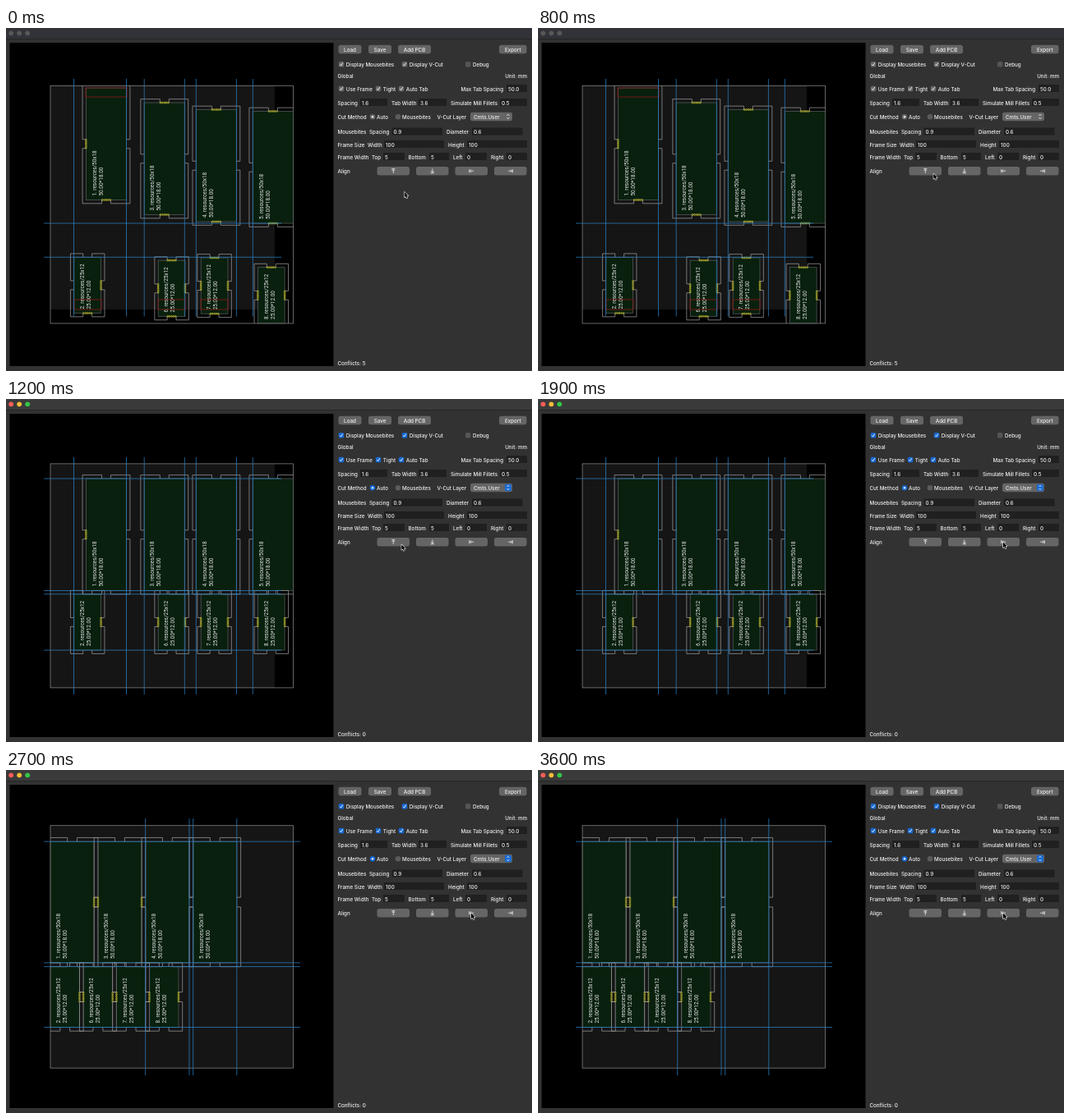
An HTML page with a canvas for the animation above (3.7 s loop, 640 by 418 pixels).

```html
<!DOCTYPE html>
<html lang="en">
<head>
<meta charset="utf-8">
<title>Panelizer</title>
<style>
html, body { margin: 0; width: 100%; height: 100%; overflow: hidden; background: #323232; }
canvas { display: block; width: 640px; height: 418px; }
</style>
</head>
<body>
<canvas id="stage" width="640" height="418"></canvas>
<script>
const ctx = document.getElementById('stage').getContext('2d');
const LOOP = 3700, STEP = 100;
const ACTIVATE = 900, ALIGN_TOP = 1100, ALIGN_LEFT = 2700;
const FONT = '500 6.25px Inter, "Open Sans", sans-serif';
const LABEL_FONT = '6.4px Roboto, "Open Sans", sans-serif';
const INK = '#f0f0f0', BLUE = '#2a80c4', HAIRLINE = 0.75;

// Board: [number, x, y, tall, slot sides, mousebite sides]
const alignedColumns = [82.5, 146.5, 168.2, 217.3, 231.3, 280.4, 300.3];
const scattered = {
  scale: 2.73, frame: [54, 70.3, 349.5, 360], fill: [54, 70, 327, 343],
  columns: alignedColumns, columnSpan: [62, 351.5],
  rows: [238, 279.3], rowEnd: 335,
  boards: [
    [1, 97.4, 73, true, 'LRB', 'LB'], [3, 168.2, 91, true, 'LRTB', 'TB'],
    [4, 231.3, 99.5, true, 'LRTB', 'TB'], [5, 300.3, 101.5, true, 'LTB', 'TB'],
    [2, 82.8, 279.3, false, 'LRTB', 'RB'], [6, 185.2, 283.2, false, 'LRTB', 'LRTB'],
    [7, 237.2, 280, false, 'LRTB', 'LRTB'], [8, 306.4, 291.7, false, 'LRT', 'LRT']
  ],
  conflicts: [[97, 73, 50, 11], [83, 331, 33, 12], [185, 331, 33, 12], [237, 331, 33, 12]]
};
const topAligned = {
  scale: 2.73, frame: [54, 78.9, 349.5, 351.9], fill: [54, 79, 327, 352],
  columns: alignedColumns, columnSpan: [71, 360],
  rows: [97, 233.5, 237.8, 306.1], rowEnd: 335,
  boards: [
    [1, 97.4, 97, true, 'LRTB', 'L'], [3, 168.2, 97, true, 'LRTB', ''],
    [4, 231.3, 97, true, 'LRTB', ''], [5, 300.3, 97, true, 'LTB', ''],
    [2, 82.8, 237.8, false, 'LRTB', 'R'], [6, 185.2, 237.8, false, 'LRTB', 'LR'],
    [7, 237.2, 237.8, false, 'LRTB', 'LR'], [8, 306.4, 237.8, false, 'LRTB', 'LR']
  ],
  conflicts: []
};
const leftAligned = {
  scale: 2.955, frame: [54, 67.7, 349.5, 363.2], fill: [54, 68, 349.5, 363],
  columns: [169.7, 223, 227.7, 280.8], columnSpan: [59, 372],
  rows: [87.2, 234.9, 239.6, 313.5], rowEnd: 358,
  boards: [
    [1, 54, 87.2, true, 'RTB', 'R'], [3, 111.9, 87.2, true, 'LRTB', 'LR'],
    [4, 169.8, 87.2, true, 'LRTB', ''], [5, 227.7, 87.2, true, 'LRTB', ''],
    [2, 54, 239.6, false, 'RTB', 'R'], [6, 94.2, 239.6, false, 'LRTB', 'LR'],
    [7, 134.4, 239.6, false, 'LRTB', 'L'], [8, 174.5, 239.6, false, 'LRTB', 'LR']
  ],
  conflicts: []
};

const ease = p => p * p * (3 - 2 * p);
const progress = (t, a, b) => ease(Math.min(1, Math.max(0, (t - a) / (b - a))));

function box(x, y, w, h, color, r = 0) {
  ctx.fillStyle = color;
  ctx.beginPath();
  ctx.roundRect(x, y, w, h, r);
  ctx.fill();
}
function outline(x, y, w, h, color) {
  ctx.strokeStyle = color;
  ctx.lineWidth = HAIRLINE;
  ctx.strokeRect(x, y, w, h);
}
function line(points, color, width = HAIRLINE) {
  ctx.strokeStyle = color;
  ctx.lineWidth = width;
  ctx.beginPath();
  points.forEach(([x, y], i) => i ? ctx.lineTo(x, y) : ctx.moveTo(x, y));
  ctx.stroke();
}
function disc(x, y, r, color) {
  ctx.fillStyle = color;
  ctx.beginPath();
  ctx.arc(x, y, r, 0, Math.PI * 2);
  ctx.fill();
}
function text(s, x, y, align = 'left') {
  ctx.font = FONT;
  ctx.fillStyle = INK;
  ctx.textAlign = align;
  ctx.fillText(s, x, y + 2.6);
}

// One board side: the slot line, broken by a tab around its middle.
function drawSide(side, rect, outer, bite, scale) {
  const [x0, y0, x1, y1] = rect;
  const vertical = side === 'L' || side === 'R';
  const index = 'LTRB'.indexOf(side);
  const edge = rect[index], slot = outer[index];
  const mid = vertical ? (y0 + y1) / 2 : (x0 + x1) / 2;
  const [from, to] = vertical ? [outer[1], outer[3]] : [outer[0], outer[2]];
  const half = scale * 2;
  const put = (along, across) => vertical ? [across, along] : [along, across];
  for (const [end, tab] of [[from, mid - half], [to, mid + half]])
    line([put(end, slot), put(tab, slot), put(tab, edge)], '#989898');
  if (!bite) return;
  ctx.strokeStyle = '#d0cc2c';
  ctx.lineWidth = 0.7;
  for (let i = -2; i <= 2; i++) {
    const [cx, cy] = put(mid + i * scale * 0.86, edge);
    ctx.beginPath();
    ctx.arc(cx, cy, 0.95, 0, Math.PI * 2);
    ctx.stroke();
  }
}

function drawBoard([number, x, y, tall, sides, bites], layout) {
  const { scale, frame } = layout;
  const [w, h] = tall ? [18, 50] : [12, 25];
  const rect = [x, y, x + w * scale, y + h * scale];
  const gap = 1.6 * scale;
  const outer = [...'LTRB'].map((side, i) =>
    sides.includes(side) ? rect[i] + (i < 2 ? -gap : gap) : frame[i]);
  outline(x, y, w * scale, h * scale, '#565a5a');
  for (const side of sides) drawSide(side, rect, outer, bites.includes(side), scale);

  ctx.save();
  ctx.translate(x + 12.2, rect[3] - 5);
  ctx.rotate(-Math.PI / 2);
  ctx.font = LABEL_FONT;
  ctx.fillStyle = '#e4e4e4';
  ctx.textAlign = 'left';
  ctx.fillText(`${number}. resources/${h}x${w}`, 0, 0);
  ctx.fillText(`${h}.00*${w}.00`, 0, 8);
  ctx.restore();
}

function drawLayout(layout) {
  const { frame, fill, scale } = layout;
  box(4.5, 18, 394, 394, '#000');
  box(fill[0], fill[1], fill[2] - fill[0], fill[3] - fill[1], '#151515');
  for (const [, x, y, tall] of layout.boards)
    box(x, y, (tall ? 18 : 12) * scale, (tall ? 50 : 25) * scale, '#09200e');
  outline(frame[0], frame[1], frame[2] - frame[0], frame[3] - frame[1], '#888');
  for (const board of layout.boards) drawBoard(board, layout);
  for (const [x, y, w, h] of layout.conflicts) outline(x, y, w, h, '#941515');
  const [top, bottom] = layout.columnSpan;
  for (const x of layout.columns) line([[x, top], [x, bottom]], BLUE);
  for (const y of layout.rows) line([[46, y], [layout.rowEnd, y]], BLUE);
}

function button(x, w, y, label, color = '#656565') {
  box(x, y - 5.3, w, 10.6, color, 2.7);
  if (label) text(label, x + w / 2, y, 'center');
}
function field(x, right, y, value) {
  box(x, y - 5, right - x, 10, '#202020');
  line([[x, y + 4.7], [right, y + 4.7]], '#454545', 0.6);
  text(value, x + 2, y);
}
function checkbox(x, y, label, checked, accent) {
  box(x, y - 3.2, 6.4, 6.4, checked ? accent : '#555', 1.5);
  if (checked) line([[x + 1.5, y + 0.2], [x + 2.7, y + 1.7], [x + 4.9, y - 1.8]], '#fff', 0.9);
  text(label, x + 9, y);
}
function radio(x, y, label, on, accent) {
  disc(x, y, 3.3, on ? accent : '#5b5b5b');
  if (on) disc(x, y, 1.2, '#fff');
  text(label, x + 5, y);
}
// Arrow pointing at a bar, turned by quarter turns from "up".
function alignIcon(x, y, turns) {
  ctx.save();
  ctx.translate(x, y);
  ctx.rotate(turns * Math.PI / 2);
  line([[-2.2, -2.6], [2.2, -2.6]], INK);
  line([[0, -2], [0, 2.8]], INK);
  line([[-1.7, -0.1], [0, -1.9], [1.7, -0.1]], INK);
  ctx.restore();
}

function drawPanel(active, pressed, conflicts) {
  const accent = active ? '#1769d2' : '#686868';
  button(404.5, 28, 26, 'Load');
  button(441, 28, 26, 'Save');
  button(477, 40, 26, 'Add PCB');
  button(600, 33.5, 26, 'Export');

  checkbox(404.8, 44.3, 'Display Mousebites', true, accent);
  checkbox(481.8, 44.3, 'Display V-Cut', true, accent);
  checkbox(559, 44.3, 'Debug', false, accent);
  text('Global', 403.5, 58);
  text('Unit: mm', 634, 58, 'right');

  checkbox(404.8, 74, 'Use Frame', true, accent);
  checkbox(449.8, 74, 'Tight', true, accent);
  checkbox(477.8, 74, 'Auto Tab', true, accent);
  text('Max Tab Spacing', 605, 74, 'right');
  field(609, 634, 74, '50.0');

  text('Spacing', 403.5, 91);
  field(431, 464, 91, '1.6');
  text('Tab Width', 469, 91);
  field(502, 536, 91, '3.6');
  text('Simulate Mill Fillets', 541, 91);
  field(601, 634, 91, '0.5');

  text('Cut Method', 403.5, 108);
  radio(446, 108.3, 'Auto', true, accent);
  radio(477, 108.3, 'Mousebites', false, accent);
  text('V-Cut Layer', 524.5, 108);
  button(565, 51, 108, '');
  text('Cmts.User', 569, 108);
  if (active) box(607, 103.8, 8, 8.4, accent, 2);
  for (const d of [-1, 1])
    line([[609.4, 108 + d], [611, 108 + d * 2.7], [612.6, 108 + d]], '#fff', 0.8);

  text('Mousebites', 403.5, 126.5);
  text('Spacing', 442, 126.5);
  field(469.5, 531, 126.5, '0.9');
  text('Diameter', 536, 126.5);
  field(567, 628.5, 126.5, '0.6');

  text('Frame Size', 403.5, 142);
  text('Width', 440, 142);
  field(460, 533, 142, '100');
  text('Height', 538, 142);
  field(561, 634, 142, '100');

  text('Frame Width', 403.5, 157);
  text('Top', 445, 157);
  field(459, 485, 157, '5');
  text('Bottom', 489.5, 157);
  field(515, 539, 157, '5');
  text('Left', 544, 157);
  field(559, 585, 157, '0');
  text('Right', 590, 157);
  field(609, 634, 157, '0');

  text('Align', 403.5, 174);
  [0, 2, 3, 1].forEach((turns, i) => {
    const x = 451.5 + i * 47.5;
    button(x, 39.5, 174.2, '', i === pressed ? '#8b8b8b' : '#656565');
    alignIcon(x + 19.8, 174.2, turns);
  });
  text(`Conflicts: ${conflicts}`, 403.5, 408.3);
}

function drawTitleBar(active) {
  box(0, 0, 640, 13, active ? '#3a3a3a' : '#313338');
  line([[0, 13.5], [640, 13.5]], '#252525', 1);
  ['#fb5e56', '#f6bd36', '#33c748'].forEach((color, i) =>
    disc(6.2 + i * 10, 6.3, 2.9, active ? color : '#585858'));
}

function drawCursor(x, y) {
  ctx.beginPath();
  for (const [dx, dy] of [[0, 0], [0, 6.6], [1.5, 5.2], [2.6, 7.6], [3.7, 7.1], [2.7, 4.8], [4.6, 4.7]])
    ctx.lineTo(x + dx, y + dy);
  ctx.closePath();
  ctx.lineJoin = 'round';
  ctx.lineWidth = 1.2;
  ctx.strokeStyle = '#eee';
  ctx.stroke();
  ctx.fillStyle = '#000';
  ctx.fill();
  ctx.lineJoin = 'miter';
}

function draw(t) {
  const active = t >= ACTIVATE;
  const layout = t < ALIGN_TOP ? scattered : t < ALIGN_LEFT ? topAligned : leftAligned;
  const pressed = t === ALIGN_TOP - STEP ? 0 : t === ALIGN_LEFT - STEP ? 2 : -1;
  box(0, 0, 640, 418, '#323232');
  drawTitleBar(active);
  drawLayout(layout);
  drawPanel(active, pressed, layout === scattered ? 5 : 0);
  const rise = progress(t, 0, 700), slide = progress(t, 1500, 1900);
  drawCursor(484.8 - 3.5 * rise + 84.7 * slide, 199.8 - 22.4 * rise - 2.8 * slide);
}

const start = performance.now();
function tick() {
  const t = (performance.now() - start) % LOOP;
  draw(Math.floor(t / STEP) * STEP);
  requestAnimationFrame(tick);
}
tick();
</script>
</body>
</html>
```
